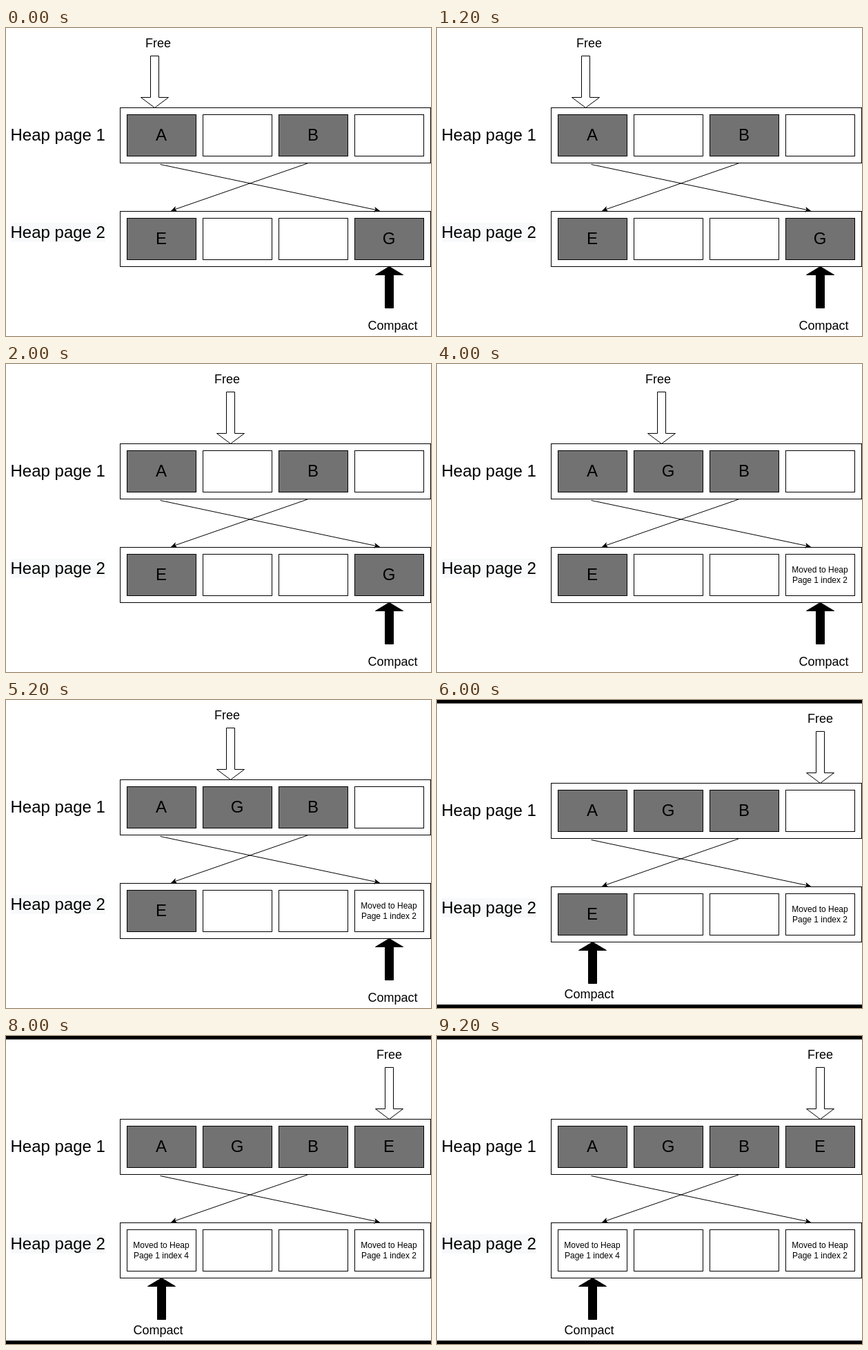
An HTML page for the animation above (10 s loop, 616 by 446 pixels).

```html
<!DOCTYPE html>
<html lang="en">
<head>
<meta charset="utf-8">
<title>Heap compaction</title>
<style>
  html, body { margin: 0; width: 100%; height: 100%; overflow: hidden; background: #fff; }
  svg { display: block; width: 616px; height: 446px; font-family: Helvetica, "Liberation Sans", Arial, sans-serif; }
  .big { font-size: 24px; }
  .mid { font-size: 18px; }
  .small { font-size: 12px; }
  .center { text-anchor: middle; }
  .line { fill: none; stroke: #000; }
  .full { fill: #727272; stroke: #000; }

  /* Every change is a hard cut */
  .diagram, .bars, .move, .show-g, .hide-g, .show-e, .hide-e {
    animation: 10s step-end infinite;
  }
  .diagram { animation-name: shift; }
  .bars { animation-name: bars; }
  .free-arrow { animation-name: free-arrow; }
  .free-label { animation-name: free-label; }
  .compact-arrow { animation-name: compact-arrow; }
  .compact-label { animation-name: compact-label; }
  .show-g { animation-name: show-g; }
  .hide-g { animation-name: hide-g; }
  .show-e { animation-name: show-e; }
  .hide-e { animation-name: hide-e; }

  @keyframes shift { 0% { transform: none; } 60%, 100% { transform: translateY(5px); } }
  @keyframes bars { 0% { visibility: hidden; } 60%, 100% { visibility: visible; } }
  @keyframes free-arrow {
    0% { transform: none; }
    20% { transform: translateX(110px); }
    60%, 100% { transform: translateX(340px); }
  }
  @keyframes free-label {
    0% { transform: none; }
    20% { transform: translateX(100px); }
    60%, 100% { transform: translateX(335px); }
  }
  @keyframes compact-arrow { 0% { transform: none; } 60%, 100% { transform: translateX(-330px); } }
  @keyframes compact-label { 0% { transform: none; } 60%, 100% { transform: translate(-340px, -10px); } }
  @keyframes show-g { 0% { visibility: hidden; } 40%, 100% { visibility: visible; } }
  @keyframes hide-g { 0% { visibility: visible; } 40%, 100% { visibility: hidden; } }
  @keyframes show-e { 0% { visibility: hidden; } 80%, 100% { visibility: visible; } }
  @keyframes hide-e { 0% { visibility: visible; } 80%, 100% { visibility: hidden; } }
</style>
</head>
<body>
<svg viewBox="0 0 616 446">
  <defs>
    <marker id="head" markerUnits="userSpaceOnUse" markerWidth="8" markerHeight="8" refX="8" refY="4" orient="auto">
      <path d="M8 4L0 0L2 4L0 8Z"/>
    </marker>
    <rect id="cell" width="100" height="60"/>
    <g id="page" class="line">
      <rect width="450" height="80"/>
      <use href="#cell" x="10" y="10"/>
      <use href="#cell" x="120" y="10"/>
      <use href="#cell" x="230" y="10"/>
      <use href="#cell" x="340" y="10"/>
    </g>
  </defs>

  <g class="diagram">
    <rect x="7" y="282" width="137" height="28" fill="#f8f9fa"/>
    <text class="big" x="6.5" y="163">Heap page 1</text>
    <text class="big" x="6.5" y="304">Heap page 2</text>

    <use href="#page" x="165.5" y="115.5"/>
    <use href="#page" x="165.5" y="265.5"/>

    <g class="big center">
      <use class="full" href="#cell" x="175.5" y="125.5"/>
      <text x="225" y="163">A</text>
      <g class="show-g">
        <use class="full" href="#cell" x="285.5" y="125.5"/>
        <text x="335" y="163">G</text>
      </g>
      <use class="full" href="#cell" x="395.5" y="125.5"/>
      <text x="445" y="163">B</text>
      <g class="show-e">
        <use class="full" href="#cell" x="505.5" y="125.5"/>
        <text x="555" y="163">E</text>
      </g>
      <g class="hide-e">
        <use class="full" href="#cell" x="175.5" y="275.5"/>
        <text x="225" y="313">E</text>
      </g>
      <g class="hide-g">
        <use class="full" href="#cell" x="505.5" y="275.5"/>
        <text x="555" y="313">G</text>
      </g>
    </g>

    <g class="small center">
      <text class="show-g"><tspan x="555" y="302">Moved to Heap</tspan><tspan x="555" y="317">Page 1 index 2</tspan></text>
      <text class="show-e"><tspan x="225" y="302">Moved to Heap</tspan><tspan x="225" y="317">Page 1 index 4</tspan></text>
    </g>

    <path class="line" d="M223.5 197.5L541.5 264.5" marker-end="url(#head)"/>
    <path class="line" d="M437 196L239.5 264.5" marker-end="url(#head)"/>

    <path class="line move free-arrow" d="M209.5 40.5h12v60h14l-20 15l-20 -15h14Z"/>
    <text class="mid center move free-label" x="220.5" y="28">Free</text>

    <path class="move compact-arrow" stroke="#000" d="M549.5 405.5h12v-48h14l-20 -12l-20 12h14Z"/>
    <text class="mid center move compact-label" x="560.5" y="437">Compact</text>
  </g>

  <path class="bars" d="M0 0h616v5h-616ZM0 441h616v5h-616Z"/>
</svg>
</body>
</html>
```
